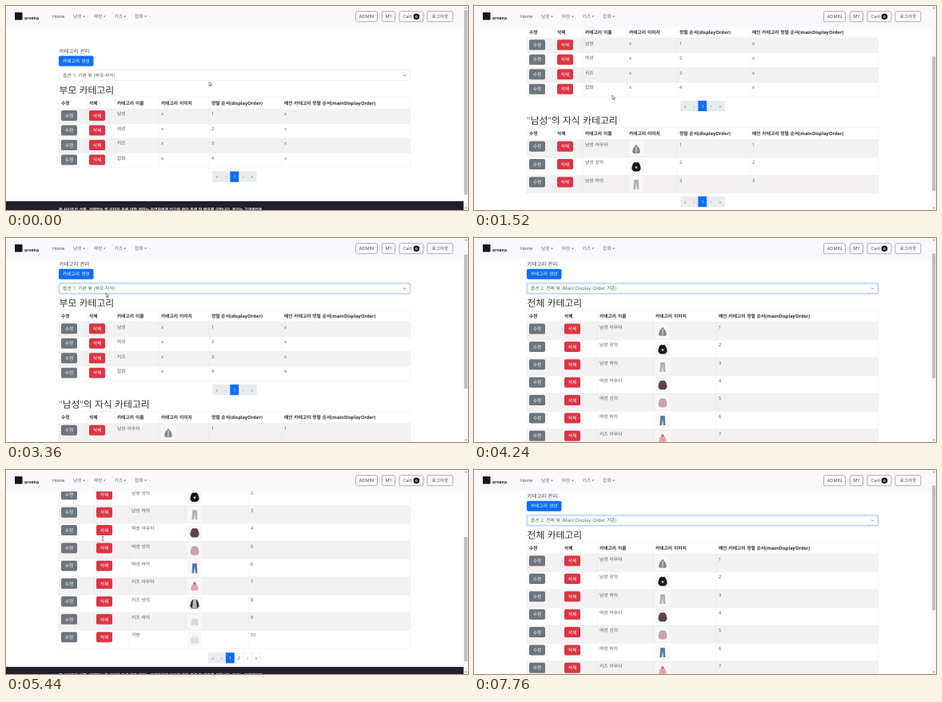
Animation of 578x256 px, one loop 7840 ms. Source, as an HTML page:

```html
<!DOCTYPE html>
<html lang="ko">
<head>
<meta charset="utf-8">
<title>카테고리 관리</title>
<style>
@property --s { syntax: '<number>'; inherits: true; initial-value: 0; }
@property --h { syntax: '<number>'; inherits: true; initial-value: 272; }
html, body { margin: 0; width: 100%; height: 100%; overflow: hidden; background: #fff; }
svg {
  display: block; width: 578px; height: 256px;
  font-family: "Open Sans", "Noto Sans CJK KR", "Noto Sans CJK", sans-serif;
  text-rendering: geometricPrecision; word-spacing: .3px;
  animation: scroll 7.84s ease-in-out infinite, size 7.84s step-end infinite;
}
#page { transform: translateY(calc(var(--s) * -1px)); }
#thumb { y: calc(5px + var(--s) * 246px / var(--h)); height: calc(62976px / var(--h)); }

/* scroll offset and page height */
@keyframes scroll {
  0%, 11.22% { --s: 0; }
  15.82%, 17.35% { --s: 118; }
  19.39% { --s: 88.8; }
  22.45%, 31.63% { --s: 49; }
  35.71%, 55.1% { --s: 23.8; }
  58.67%, 62.24% { --s: 77; }
  65.82% { --s: 103.5; }
  68.37%, 71.43% { --s: 129.5; }
  81.63%, 100% { --s: 23.8; }
}
@keyframes size {
  0% { --h: 272; }
  9.18% { --h: 374; }
  54.08%, 100% { --h: 403; }
}

/* what is on the page */
#short, #parent, #child, #all, #focus, #arrow, #beam { animation: 7.84s step-end infinite; }
#short { animation-name: short; }
#parent { animation-name: parent; }
#child { animation-name: child; }
#all { animation-name: all; }
#focus { animation-name: focus; }
#beam { animation-name: beam; }
#arrow { animation-name: parent, move; animation-timing-function: step-end, ease-in-out; }
@keyframes short { 0% { opacity: 1; } 9.18%, 100% { opacity: 0; } }
@keyframes parent { 0% { opacity: 1; } 54.08%, 100% { opacity: 0; } }
@keyframes child { 0% { opacity: 0; } 9.18% { opacity: 1; } 54.08%, 100% { opacity: 0; } }
@keyframes all { 0% { opacity: 0; } 54.08%, 100% { opacity: 1; } }
@keyframes focus { 0% { opacity: 0; } 41.84%, 100% { opacity: 1; } }
@keyframes beam { 0% { opacity: 0; } 63.27% { opacity: 1; } 71.43%, 100% { opacity: 0; } }
@keyframes move {
  0%, 1% { transform: translate(254px, 95px); }
  8.16%, 11.22% { transform: translate(173px, 134px); }
  17.35%, 20% { transform: translate(173px, 112px); }
  24%, 32.65% { transform: translate(172.5px, 109px); }
  40.8% { transform: translate(125px, 62px); }
  42.8%, 100% { transform: translate(125px, 69px); }
}
</style>
</head>
<body>
<script>
const INK = '#2b2f34', GRAY = '#6c757d', RED = '#dc3545', BLUE = '#0d6efd', LINE = '#e5e7ea';

const rect = (x, y, w, h, fill, more = '') =>
  `<rect x="${x}" y="${y}" width="${w}" height="${h}" fill="${fill}" ${more}/>`;
const path = (d, fill, more = '') => `<path d="${d}" fill="${fill}" ${more}/>`;
const group = (id, ...parts) => `<g id="${id}">${parts.join('')}</g>`;

// y is the middle of the line
const text = (x, y, str, { size = 5.8, fill = INK, bold = 400, anchor = 'start' } = {}) =>
  `<text x="${x}" y="${y + size * 0.37}" font-size="${size}" fill="${fill}" font-weight="${bold}" text-anchor="${anchor}">${str}</text>`;

const button = (x, y, w, label, fill) =>
  rect(x, y - 6.5, w, 13, fill, 'rx="1.9"') +
  text(x + w / 2, y, label, { fill: '#fff', anchor: 'middle' });

const outline = (x, w, label, shift = 0) =>
  rect(x, 6.7, w, 13, 'none', 'rx="2" stroke="#6c7177" stroke-width=".55"') +
  text(x + w / 2 + shift, 13.3, label, { size: 5.6, fill: '#454a50', anchor: 'middle' });

const TOP = 'M-2-6Q0-5 2-6Q5-5 6 2L5.6 4.5 4.6 4.5 4.2 6Q0 7-4.2 6L-4.6 4.5-5.6 4.5-6 2Q-5-5-2-6Z';
const HOOD = 'M-2-3Q0-8.5 2-3Q4.6-2 5.2 4.5L4 6H-4L-5.2 4.5Q-4.6-2-2-3Z';
const PANTS = 'M-3-6.5H3L3.8 6.5H1L0-2-1 6.5H-3.8Z';
const WIDE = 'M-3.5-4H3.5L5.5 4.5H.6L0 2-.6 4.5H-5.5Z';
const goods = {
  zip: path(HOOD, '#85868b') + path('M-.8-3H.8L.5 5.5H-.5Z', '#dcdcdf'),
  sweat: path(TOP, '#17171a') + '<circle cy="1" r="1.6" fill="#b9b9bd"/>',
  slacks: path(PANTS, '#b5b1ab'),
  coat: path(TOP, '#5b4645'),
  knit: path(TOP, '#c9a1b1'),
  jeans: path(PANTS, '#587aa8'),
  parka: path(HOOD, '#e3a3a8') + path('M-2-3Q0-8.5 2-3L0-1.5Z', '#c96a72'),
  raglan: path(TOP, '#2f3443') + path('M-2-6H2L3.2 6H-3.2Z', '#b7bac2'),
  shorts: path(WIDE, '#d9d6d5'),
  bag: rect(-5.5, -2.5, 11, 8, '#e4dedb', 'rx="1"') +
    path('M-3.5-2.5Q0-8.5 3.5-2.5', 'none', 'stroke="#d8d1cc" stroke-width=".8"'),
};
const photo = (x, y, kind) =>
  `<g transform="translate(${x} ${y})">${rect(-9, -9.2, 18, 18.4, '#f8f7f7')}<g transform="translate(0 .5) scale(.93)">${goods[kind]}</g></g>`;

// cols: left edges of the columns; rows: cell values after the two buttons
function table(top, cols, heads, rows, rowH) {
  const first = top + 15, bottom = first + rows.length * rowH;
  let out = heads.map((h, i) => text(cols[i] + 3, top + 7.6, h, { bold: 700, size: 5.75 })).join('');
  rows.forEach((row, r) => {
    const y = first + r * rowH;
    if (r % 2 === 0) out += rect(66, y, 440, rowH, '#f3f1f2');
    out += button(cols[0] + 3, y + 8.6, 20, '수정', GRAY) + button(cols[1] + 3, y + 8.6, 20, '삭제', RED);
    row.forEach((v, i) => {
      const x = cols[i + 2];
      out += goods[v] ? photo(x + 12, y + 11.2, v) : text(x + 3, y + 6.2, v, { fill: '#54585d' });
    });
  });
  let grid = `M66 ${top}H506`;
  for (let r = 0; r <= rows.length; r++) grid += `M66 ${first + r * rowH}H506`;
  for (const x of [...cols, 506]) grid += `M${x} ${top}V${bottom}`;
  return out + path(grid, 'none', `stroke="${LINE}" stroke-width=".4"`);
}

function pager(y, pages) {
  const cells = ['«', '‹', ...pages, '›', '»'], w = 10.9, left = 286 - cells.length * w / 2;
  return cells.map((c, i) => {
    const on = c === '1', off = i < 2 || (pages.length === 1 && !on);
    return rect(left + i * w, y - 6.5, w, 13, on ? BLUE : off ? '#e9ecef' : '#fff',
        `stroke="${on ? BLUE : '#dee2e6'}" stroke-width=".35"`) +
      text(left + (i + 0.5) * w, y, c, { anchor: 'middle', size: 5.6, fill: on ? '#fff' : off ? GRAY : '#4a4e53' });
  }).join('');
}

const footer = y => rect(0, y, 578, 40, '#20202b') +
  text(66, y + 10.5, '본 사이트의 상품, 거래정보 및 이미지 등에 대한 권리는 운영자에게 있으며 무단 복제 및 배포를 금합니다. 문의는 고객센터로',
    { size: 4.9, fill: '#f4f4f6', bold: 700 });
const title = (y, str) => text(66.5, y, str, { size: 11.85, bold: 300 });
const option = str => text(71, 87, str, { fill: '#54585d' });

const NAMES = ['수정', '삭제', '카테고리 이름', '카테고리 이미지'];
const ORDER = '정렬 순서(displayOrder)', MAIN = '메인 카테고리 정렬 순서(mainDisplayOrder)';
const six = [66, 101, 136, 191, 254, 345], five = [66, 110, 154, 224, 303];
const kinds = ['남성', '여성', '키즈', '잡화'];
const items = ['zip', 'sweat', 'slacks', 'coat', 'knit', 'jeans', 'parka', 'raglan', 'shorts', 'bag'];
const wear = ['아우터', '상의', '하의'];
const products = items.map((kind, i) =>
  [i < 9 ? `${kinds[Math.floor(i / 3)]} ${wear[i % 3]}` : '가방', kind, `${i + 1}`]);

const field = (fill, stroke) => rect(66.3, 80.6, 439.4, 13, fill, `rx="1.9" ${stroke}`);
const form = text(66.5, 56.2, '카테고리 관리', { size: 6.5, fill: '#454a50' }) +
  button(66, 69, 43.5, '카테고리 생성', BLUE) +
  field('#fff', 'stroke="#dee2e6" stroke-width=".5"') +
  group('focus', field('none', 'stroke="#cfe2ff" stroke-width="1.6"'),
    field('none', 'stroke="#86b7fe" stroke-width=".5"')) +
  path('M497 86.3L498.6 87.9 500.2 86.3', 'none', 'stroke="#343a40" stroke-width=".7"');

const page = group('page', form,
  group('parent', option('옵션 1: 기본 뷰 (부모-자식)'), title(105.3, '부모 카테고리'),
    table(114, six, [...NAMES, ORDER, MAIN], kinds.map((k, i) => [k, 'x', `${i + 1}`, 'x']), 18.5),
    pager(214.3, ['1'])),
  group('short', footer(245)),
  group('child', title(232.5, '"남성"의 자식 카테고리'),
    table(241.4, six, [...NAMES, ORDER, MAIN], products.slice(0, 3).map(p => [...p, p[2]]), 22.4),
    pager(334.3, ['1']), footer(346.8)),
  group('all', option('옵션 2: 전체 뷰 (Main Display Order 기준)'), title(105.3, '전체 카테고리'),
    table(114.3, five, [...NAMES, MAIN], products, 22.37),
    pager(365.2, ['1', '2']), footer(376.6)));

const menu = kinds.map((k, i) => {
  const x = 84 + i * 25.7;
  return text(x, 13.3, k, { fill: '#666a70' }) + path(`M${x + 12} 12.4h3l-1.5 1.7Z`, '#666a70');
}).join('');

const nav = rect(0, 0, 578, 27, '#f9f9fd') +
  rect(11, 8, 9.5, 9.5, '#15151a') +
  text(23, 14.8, 'orvena', { size: 5.2, bold: 700, fill: '#15151a' }) +
  text(58, 13.3, 'Home', { size: 5.4, fill: '#3c4146' }) + menu +
  outline(437.5, 27, 'ADMIN') + outline(470.3, 16.4, 'MY') + outline(492, 30, 'Cart', -4.5) +
  '<circle cx="513.5" cy="13.3" r="3.8" fill="#15151a"/>' +
  text(513.5, 13.3, '0', { size: 4.4, fill: '#fff', bold: 700, anchor: 'middle' }) +
  outline(527, 32, '로그아웃');

const bar = rect(572.5, 0, 5.5, 256, '#f8f8f9') +
  path('M573.8 3.2L575.3 1.5 576.8 3.2ZM573.8 252.8L575.3 254.5 576.8 252.8Z', '#8a8a8a') +
  rect(573.2, 5, 4.2, 231, '#bfbfc1', 'id="thumb"');

const pointers =
  group('arrow', path('M0 0V5.2L1.3 4.1 2.2 6 3 5.6 2.2 3.8H3.8Z', '#fff', 'stroke="#222" stroke-width=".5"')) +
  group('beam', path('M119.7 83.5H122.3M121 83.5V88.5M119.7 88.5H122.3', 'none', 'stroke="#333" stroke-width=".6"'));

document.body.innerHTML = `<svg viewBox="0 0 578 256">${page}${nav}${bar}${pointers}</svg>`;
</script>
</body>
</html>
```
